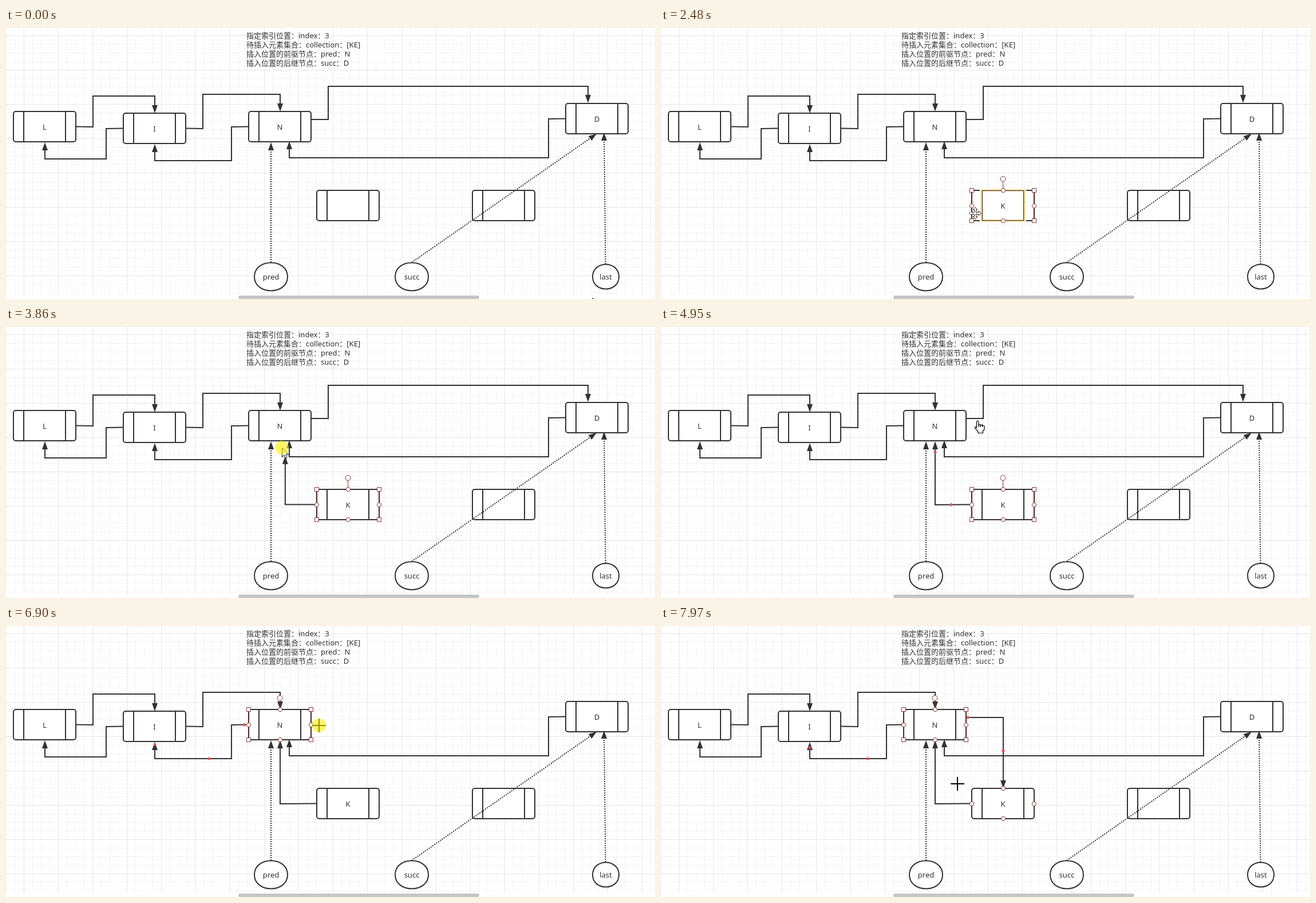
Animation, 1134 px wide and 474 px high, one loop 8000 ms. Source, as an HTML page with a canvas:

```html
<!DOCTYPE html>
<html lang="zh">
<head>
<meta charset="utf-8">
<title>Linked list insertion</title>
<style>
html, body { margin: 0; width: 100%; height: 100%; overflow: hidden; background: #fff; }
canvas { display: block; }
</style>
</head>
<body>
<canvas id="stage" width="1134" height="474"></canvas>
<script>
const ctx = document.getElementById('stage').getContext('2d');
const LOOP = 8000, W = 1134, H = 474;
const INK = '#323232', SELECT = '#833';
const FONT = '13px "Noto Sans", "Noto Sans CJK SC", "Noto Sans CJK", sans-serif';

const NOTES = ['指定索引位置：index：3', '待插入元素集合：collection：[KE]',
  '插入位置的前驱节点：pred：N', '插入位置的后继节点：succ：D'];
const NODE_W = 109, NODE_H = 53;
const N = { x: 424, y: 146, label: 'N' }, K = { x: 543, y: 284, label: 'K' };
const nodes = [{ x: 13, y: 146, label: 'L' }, { x: 205, y: 149, label: 'I' }, N,
  { x: 978, y: 132, label: 'D' }, K, { x: 815, y: 284, label: '' }];

const links = [
  [[123, 172.5], [152, 173], [152, 119], [260, 119], [260, 149]],
  [[205, 175.5], [175, 176], [175, 229], [68, 229], [68, 200]],
  [[315, 175.5], [344, 176], [344, 116], [479, 116], [479, 146]],
  [[978, 158.5], [948, 159], [948, 227], [495, 227], [495, 198]]
];
const linkNI = [[424, 172.5], [394, 173], [394, 232], [260, 232], [260, 203]];
const linkND = [[534, 160], [563, 160], [563, 102], [1017, 102], [1017, 131]];
const linkKN = [[543, 310.5], [479, 311], [479, 200]];
const linkNK = [[534, 160], [598, 160], [598, 284]];
const pointers = [
  { label: 'pred', x: 463, rx: 29, ry: 24.5, line: [[463, 410], [463, 200]] },
  { label: 'succ', x: 709, rx: 29, ry: 24.5, line: [[709, 410], [1032, 185]] },
  { label: 'last', x: 1048, rx: 23, ry: 21.5, line: [[1047.5, 413], [1045, 183]] }
];

// time, x, y, cursor shape from then on
const track = [
  [0, 1024, 472, 'arrow'], [70, 1024, 472, 'arrow'], [540, 608, 316, 'arrow'],
  [770, 611, 312, 'beam'], [850, 611, 312, 'beam'], [1010, 611, 309.5, 'beam'],
  [2220, 611, 309.5, 'beam'], [2400, 563, 321, 'move'], [2480, 549, 324, 'move'],
  [2550, 549, 324, 'move'], [2630, 541, 324, 'move'], [3010, 541, 323, 'plus'],
  [3170, 542, 313, 'plus'], [3320, 542, 313, 'plus'], [3400, 521, 310, 'arrow'],
  [3860, 482, 211, 'arrow'], [3930, 482, 211, 'arrow'], [4010, 479, 202, 'plus'],
  [4490, 479, 202, 'arrow'], [4870, 551, 167, 'hand'], [4950, 553, 163, 'hand'],
  [5020, 553, 163, 'hand'], [5260, 573, 162, 'hand'], [5810, 573, 162, 'arrow'],
  [5980, 573, 162, 'arrow'], [6590, 480, 180, 'arrow'], [6740, 485, 180, 'plus'],
  [6900, 547, 174, 'plus'], [6970, 547, 174, 'arrow'], [7510, 598, 284, 'plus'],
  [7590, 602, 289, 'plus'], [7930, 518, 276, 'plus'], [LOOP, 518, 276, 'plus']
];
const within = (t, a, b) => t >= a && t < b;

function cursorAt(t) {
  const i = Math.max(1, track.findIndex(k => k[0] > t));
  const [t0, x0, y0, kind] = track[i - 1], [t1, x1, y1] = track[i];
  const p = (t - t0) / (t1 - t0);
  return { x: x0 + (x1 - x0) * p, y: y0 + (y1 - y0) * p, kind };
}

function pen(color, width) {
  ctx.strokeStyle = color;
  ctx.lineWidth = width;
}

function trace(points, closed) {
  ctx.beginPath();
  points.forEach(([x, y]) => ctx.lineTo(x, y));
  if (closed) ctx.closePath();
}

function shape(path, fill) {
  path();
  ctx.fillStyle = fill;
  ctx.fill();
  ctx.stroke();
}

function circle(x, y, r) {
  ctx.beginPath();
  ctx.arc(x, y, r, 0, Math.PI * 2);
}

// A squarish round made of two cubic curves
function round(x, y, rx, ry) {
  const reach = ry * 4 / 3;
  ctx.beginPath();
  ctx.moveTo(x - rx, y);
  ctx.bezierCurveTo(x - rx, y - reach, x + rx, y - reach, x + rx, y);
  ctx.bezierCurveTo(x + rx, y + reach, x - rx, y + reach, x - rx, y);
  ctx.closePath();
}

function disc(x, y, r, color) {
  circle(x, y, r);
  ctx.fillStyle = color;
  ctx.fill();
}

function text(str, x, y, align) {
  ctx.font = FONT;
  ctx.textAlign = align;
  ctx.fillStyle = INK;
  ctx.fillText(str, x, y);
}

function grid() {
  ctx.fillStyle = '#fff';
  ctx.fillRect(0, 0, W, H);
  const shade = offset => { ctx.fillStyle = offset % 60 ? '#f4f4f4' : '#e7e7e7'; };
  for (let x = 1; x < W; x += 15) {
    shade(x - 31);
    ctx.fillRect(x, 0, 1, 467);
  }
  for (let y = 13; y < 467; y += 15) {
    shade(y - 13);
    ctx.fillRect(0, y, W, 1);
  }
  ctx.fillStyle = '#c6c6c6';
  ctx.beginPath();
  ctx.roundRect(406, 468, 421, 6, 3);
  ctx.fill();
}

function arrowLine(points, dotted) {
  const [x, y] = points[points.length - 1], [px, py] = points[points.length - 2];
  const angle = Math.atan2(y - py, x - px);
  const stop = [x - 8 * Math.cos(angle), y - 8 * Math.sin(angle)];
  pen(INK, 2);
  ctx.setLineDash(dotted ? [2, 2] : []);
  trace([...points.slice(0, -1), stop]);
  ctx.stroke();
  ctx.setLineDash([]);
  ctx.save();
  ctx.translate(x, y);
  ctx.rotate(angle);
  trace([[0, 0], [-14, -5], [-14, 5]], true);
  ctx.fillStyle = INK;
  ctx.fill();
  ctx.restore();
}

function node({ x, y, label }) {
  pen(INK, 2);
  shape(() => {
    ctx.beginPath();
    ctx.roundRect(x, y, NODE_W, NODE_H, 4);
  }, '#fff');
  for (const dx of [18, 91]) {
    trace([[x + dx, y], [x + dx, y + NODE_H]]);
    ctx.stroke();
  }
  if (label) text(label, x + 54.5, y + 32, 'center');
}

function anchors({ x, y }) {
  pen(SELECT, 1);
  for (const [dx, dy] of [[0, 27], [55, 0], [NODE_W, 27], [55, NODE_H]])
    shape(() => circle(x + dx, y + dy, 3.6), '#fff');
}

function selection(n) {
  const { x, y } = n;
  pen('#5c2020', 1.5);
  for (const dx of [0, NODE_W]) {
    trace([[x + dx, y], [x + dx, y + NODE_H]]);
    ctx.stroke();
  }
  pen(SELECT, 1);
  trace([[x + 54.5, y], [x + 54.5, y - 15]]);
  ctx.stroke();
  shape(() => circle(x + 54.5, y - 20, 4.5), '#fff');
  for (const dx of [0, NODE_W]) for (const dy of [0, NODE_H])
    shape(() => {
      ctx.beginPath();
      ctx.rect(x + dx - 3.5, y + dy - 3.5, 7, 7);
    }, '#fff');
  anchors(n);
}

function editor({ x, y }) {
  pen('#fff', 7);
  ctx.strokeRect(x + 17.5, y, 74, NODE_H);
  pen('#fae6b8', 4);
  ctx.strokeRect(x + 17.5, y, 74, NODE_H);
  pen('#f0c878', 1.5);
  ctx.strokeRect(x + 17, y - 0.5, 75, NODE_H + 1);
  pen(INK, 1);
  ctx.strokeRect(x + 18.5, y + 0.5, 72, NODE_H - 1);
}

// Dots spaced evenly along a link, marching towards its arrowhead
function dots(points, elapsed) {
  let start = 0, next = elapsed * 0.078 % 120;
  for (let i = 1; i < points.length; i++) {
    const [x0, y0] = points[i - 1], [x1, y1] = points[i];
    const len = Math.hypot(x1 - x0, y1 - y0);
    for (; next < start + len; next += 120) {
      const p = (next - start) / len;
      disc(x0 + (x1 - x0) * p, y0 + (y1 - y0) * p, 2.5, '#e34f55');
    }
    start += len;
  }
}

function dragLine(from, t) {
  const { x, y } = cursorAt(t - 70);
  arrowLine([from, [x, from[1]], [x, y]]);
}

const cursors = {
  arrow() {
    pen('#000', 1);
    shape(() => trace([[0.5, 0.5], [0.5, 16.5], [4, 13.2], [6.5, 18.5], [9, 17.5],
      [6.8, 12.2], [11.5, 12]], true), '#fff');
  },
  hand() {
    pen('#000', 1.2);
    shape(() => {
      ctx.beginPath();
      ctx.moveTo(-1.5, 14);
      ctx.lineTo(-1.5, 2);
      ctx.quadraticCurveTo(0, -0.5, 1.8, 2);
      ctx.lineTo(1.8, 7);
      for (const x of [5, 8.5, 12]) ctx.quadraticCurveTo(x - 1, 6.2 + x / 6, x, 9 + x / 8);
      ctx.lineTo(12, 16);
      ctx.lineTo(9.5, 19);
      ctx.lineTo(9.5, 22.5);
      ctx.lineTo(1, 22.5);
      ctx.lineTo(1, 20);
      ctx.lineTo(-4.5, 13.5);
      ctx.quadraticCurveTo(-5, 10, -1.5, 13);
      ctx.closePath();
    }, '#fff');
    for (const x of [1.8, 5, 8.5]) {
      trace([[x, 7], [x, 12]]);
      ctx.stroke();
    }
  },
  beam() {
    pen('#000', 1.2);
    trace([[0, -8], [0, 8]]);
    ctx.stroke();
    for (const y of [-8, 8]) {
      trace([[-3, y], [3, y]]);
      ctx.stroke();
    }
  },
  move() {
    const arm = [[-1.5, -1.5], [-1.5, -6], [-4, -6], [0, -10.5], [4, -6], [1.5, -6]];
    const outline = [0, 1, 2, 3].flatMap(q => arm.map(([x, y]) =>
      [[x, y], [-y, x], [-x, -y], [y, -x]][q]));
    pen('#222', 1);
    shape(() => trace(outline, true), '#fff');
  },
  plus() {
    ctx.fillStyle = '#000';
    ctx.fillRect(-12, -1, 24, 2);
    ctx.fillRect(-1, -12, 2, 24);
  }
};

function cursor(t) {
  const { x, y, kind } = cursorAt(t);
  const pressed = within(t, 620, 770) || within(t, 3320, 4050) ||
    within(t, 5030, 5180) || within(t, 6880, 7510);
  ctx.save();
  ctx.translate(Math.round(x), Math.round(y));
  cursors[kind]();
  if (pressed) disc(0, 0, 12, 'rgba(255, 240, 0, .6)');
  ctx.restore();
}

function draw(t) {
  K.label = t >= 1550 ? 'K' : '';
  grid();
  NOTES.forEach((s, i) => text(s, 420, 18 + 16 * i, 'left'));
  nodes.forEach(node);
  [...links, linkNI].forEach(l => arrowLine(l));
  if (t < 5810) arrowLine(linkND);
  if (t >= 4010) arrowLine(linkKN);
  if (t >= 7510) arrowLine(linkNK);
  if (within(t, 3400, 4010)) dragLine(linkKN[0], t);
  if (within(t, 6970, 7510)) dragLine(linkNK[0], t);
  for (const p of pointers) {
    arrowLine(p.line, true);
    pen(INK, 2);
    shape(() => round(p.x, 435, p.rx, p.ry), '#fff');
    text(p.label, p.x, 440, 'center');
  }

  if (within(t, 4490, 5030)) dots(linkKN, t - 4490);
  if (within(t, 5180, 5810)) dots(linkND, t - 5180);
  if (within(t, 6800, 6970)) dots(linkNI, t - 6800);
  if (t >= 7944) [linkNI, linkNK].forEach(l => dots(l, t - 7944));

  if (within(t, 770, 3320)) editor(K);
  if (within(t, 620, 5030)) selection(K);
  if (within(t, 4010, 4570) || within(t, 6280, 6740)) anchors(N);
  if (t >= 6740) selection(N);
  if (t >= 7440) anchors(K);

  // The caret blinks on a 540 ms rhythm that restarts with each key press
  ctx.fillStyle = INK;
  if (within(t, 850, 1390)) ctx.fillRect(597, 302, 1, 17);
  if (within(t, 1550, 2090) || within(t, 2630, 3170)) ctx.fillRect(601, 301, 1, 17);
  cursor(t);
}

function frame() {
  draw(performance.now() % LOOP);
  requestAnimationFrame(frame);
}
frame();
</script>
</body>
</html>
```
